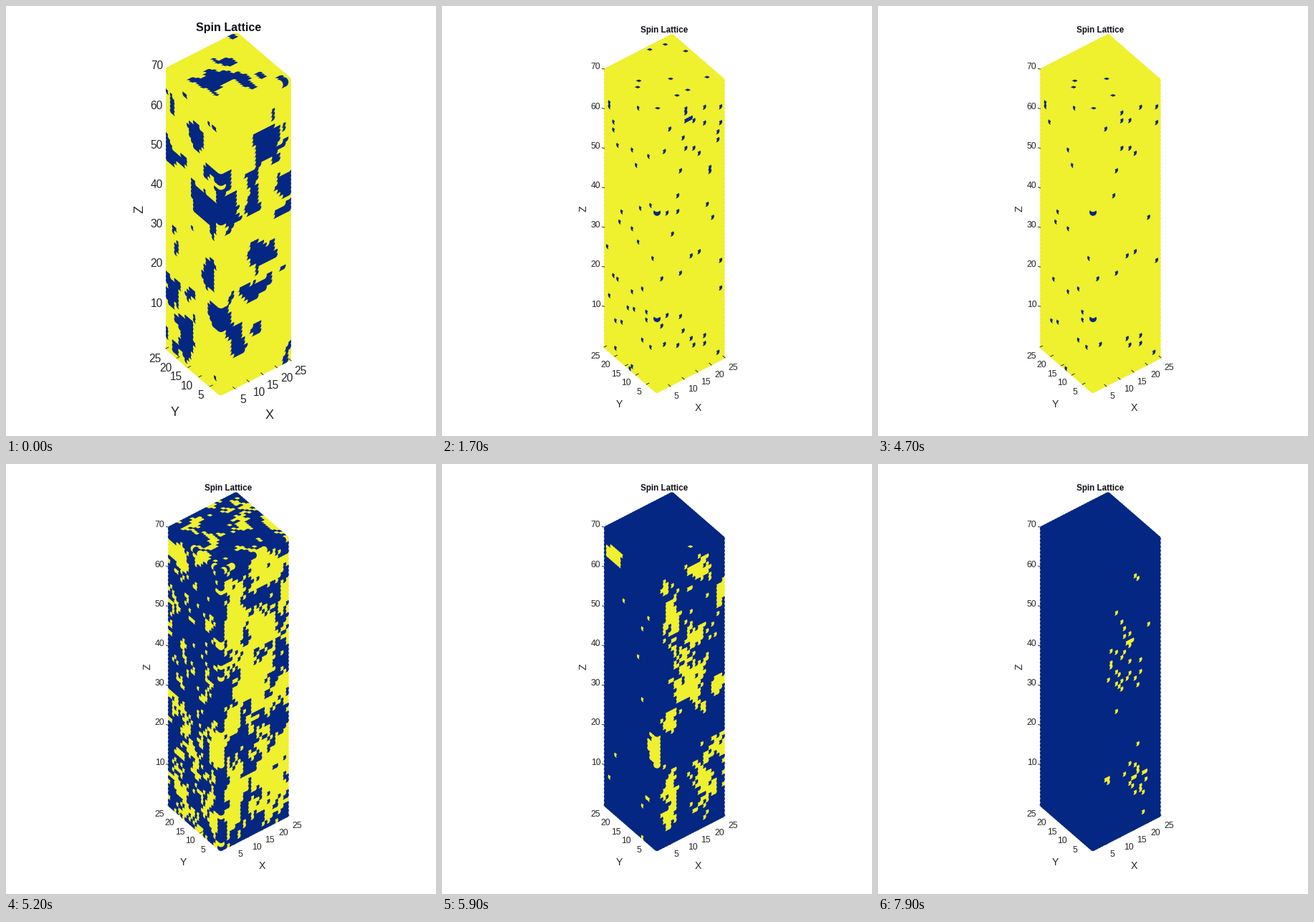
Write a matplotlib script that moves like this. It is 600 by 600 pixels and loops after 8000 ms.

```python
import numpy as np
import matplotlib.pyplot as plt
from matplotlib.animation import FuncAnimation
from matplotlib.colors import to_rgba

plt.rcParams["font.family"] = "Liberation Sans"
rng = np.random.default_rng(11)

SIZE, DPI, FRAMES, STEP = 600, 100, 80, 100
YELLOW, BLUE, INK = "#eff02e", "#042783", "#262626"
NX, NZ = 25, 71
SWITCH = 14          # the large view gives way to the small one
FLIP = 48            # the field reverses
PX = 72 / DPI        # points per pixel


class View:
    """Oblique projection of the lattice, drawn with discs of one radius."""

    def __init__(self, radius, origin, x, y, z):
        self.r, self.origin = radius, np.array(origin)
        self.axes = np.array([x, y, z])

    def centers(self):
        return self.origin + cells @ self.axes

    def visible(self):
        return self.centers() + peek * self.r


LARGE = View(7, (300, 536.2), (3.79, -1.92), (-2.92, -2.5), (0, -5.513))
SMALL = View(5, (300, 535), (3.74, -1.92), (-2.88, -2.5), (0, -5.493))

# Only the three faces towards the viewer are needed; far spins come first
cells = np.array([(i, j, k) for i in range(NX) for j in range(NX)
                  for k in range(NZ) if i == 0 or j == 0 or k == NZ - 1])
cells = cells[np.argsort(cells @ np.array([-2.3, -2.9, 4.93]), kind="stable")]
I, J, K = cells.T
count = len(cells)
front = (I == 0) & (J == 0)
top = (K == NZ - 1) & (I > 0) & (J > 0)
right = (J == 0) & ~front
left = (I == 0) & ~front
slope = np.select([right, left], [0.51, -0.87], 0.0)

# Middle of the part of each disc its neighbours leave uncovered
peek = np.select([front[:, None], top[:, None], right[:, None]],
                 [(0, 0.8), (0.05, -0.74), (0.64, 0.2)], (-0.66, 0.2))


def smooth_noise(passes=2):
    """Random field over the lattice with domains a few spins wide."""
    field = rng.normal(size=(NX, NX, NZ))
    for axis in (0, 1, 2) * passes:
        field = field + np.roll(field, 1, axis) + np.roll(field, -1, axis)
    values = field[I, J, K]
    return (values - values.mean()) / values.std()


def domains(view, boxes, floor, rough=0.3):
    """Positive inside domains: a few large ones plus small random ones.

    Each box is a centre with half width and half height, sheared to its face.
    """
    x, y = view.visible().T
    depth = np.full(count, -floor)
    for cx, cy, w, h in boxes:
        dx, dy = x - cx, y - cy
        edge = np.maximum(abs(dx) / w, abs(dy + slope * dx) / h)
        depth = np.maximum(depth, 1 - edge)
    return depth + rough * smooth_noise()


def erode(depth, first, span):
    """Domains shrink from the rim inward, with some scatter."""
    mix = 0.6 * np.clip(depth, 0, 1) + 0.4 * rng.random(count)
    return first + np.floor(span * mix).astype(int)


def pin(times, picks, keep, first, last):
    """Pinned spins: a share holds for good, the others let go early on."""
    n = len(picks)
    let_go = first + (last - first) * rng.random(n) ** 2
    times[picks] = np.where(rng.random(n) < keep, FRAMES, let_go.astype(int))


def cloud(view, x, y, sx, sy, n):
    """The spins nearest to n points scattered about one place."""
    spots = view.visible()
    points = rng.normal((x, y), (sx, sy), (n, 2))
    return [np.argmin(((spots - p) ** 2).sum(axis=1)) for p in points]


BLUE_DOMAINS = [
    (234, 213, 13, 12), (265, 180, 9, 15), (283, 283, 18, 18), (286, 372, 7, 26),
    (234, 398, 8, 18), (252, 460, 9, 26), (298, 438, 13, 16), (362, 194, 15, 22),
    (346, 258, 8, 28), (387, 262, 11, 28), (308, 285, 13, 18), (358, 338, 15, 16),
    (349, 398, 20, 14), (320, 468, 11, 22), (303, 102, 28, 10)]
GOLD_DOMAINS = [
    (237, 128, 12, 10), (294, 400, 8, 22), (320, 215, 13, 50), (358, 148, 18, 22),
    (388, 184, 8, 28), (357, 242, 26, 27), (347, 302, 25, 36), (381, 315, 16, 18),
    (317, 356, 10, 17), (384, 390, 10, 24), (371, 440, 18, 38), (320, 468, 10, 45)]
GOLD_CLOUDS = [(342, 262, 13, 24, 46), (350, 304, 16, 8, 20), (365, 438, 9, 18, 26),
               (355, 155, 4, 3, 6), (320, 440, 2, 7, 5)]

# A spin is blue on [start, off) and again from on
depth = domains(LARGE, BLUE_DOMAINS, 0.45)
off = np.where(depth > 0, erode(depth, 1, 9), 0)
pin(off, rng.choice(np.flatnonzero(~front), 105, replace=False), 0.45, 10, 47)
off[front & np.isin(K, (18, 45))] = FRAMES
start = np.where((off > 9) & (depth <= 0), 1, 0)

tide = np.clip(0.5 + 0.3 * smooth_noise(), 0, 1)
on = FLIP + np.floor(7.5 * (0.6 * tide + 0.4 * rng.random(count))).astype(int)
depth = domains(SMALL, GOLD_DOMAINS, 0.6)
on = np.where(depth > 0, erode(depth, 56, 10), on)
specks = (rng.random(count) < 0.02) & (depth <= 0)
on[specks] = rng.integers(56, 61, specks.sum())
for spot in GOLD_CLOUDS:
    pin(on, cloud(SMALL, *spot), 0.7, 67, 79)

fig = plt.figure(figsize=(SIZE / DPI, SIZE / DPI), dpi=DPI, facecolor="white")
ax = fig.add_axes([0, 0, 1, 1])
ax.set(xlim=(0, SIZE), ylim=(SIZE, 0))
ax.axis("off")
spins = ax.scatter(*LARGE.centers().T, s=1, linewidths=0, zorder=2)


def label(spot, text, size, **style):
    style = {"ha": "center", "va": "center", "color": INK, **style}
    return ax.text(*spot, text, fontsize=size * PX, zorder=4, **style)


def tick(spot, way):
    x, y = spot
    return ax.plot([x, x + way[0]], [y, y + way[1]], color=INK, lw=0.7, zorder=3)[0]


def ruler(first, last, corner, end, way, size, ha):
    """Numbers 5 to 25 and their tick marks along one bottom edge."""
    parts = []
    for n, (spot, mark) in enumerate(zip(np.linspace(first, last, 5),
                                         np.linspace(corner, end, 6)[1:])):
        parts += [label(spot, str(5 * n + 5), size, ha=ha), tick(mark, way)]
    return parts


def heights(x, y, size):
    return [label((x, y + 55.2 * n), str(70 - 10 * n), size, ha="right")
            for n in range(7)]


def names(title, x, y, z, title_size, size):
    return [label(title, "Spin Lattice", title_size, weight="bold", color="#101018"),
            label(x, "X", size), label(y, "Y", size),
            label(z, "Z", size, rotation=90)]


X_WAY, Y_WAY = (-3, -2.6), (3.6, -1.8)
large_parts = [
    *names((310.5, 30), (368, 571), (236, 567), (187, 283), 16, 18),
    *heights(219, 84, 15.5),
    *ruler((326, 549), (402, 509.5), (300, 544), (398, 495), X_WAY, 15.5, "left"),
    *ruler((276, 543), (217, 492.5), (300, 544), (223, 478), Y_WAY, 15.5, "right")]
small_parts = [
    *names((310.5, 34.5), (357, 561), (247, 556), (198, 283), 11.6, 14),
    *heights(221.5, 85.5, 12.2),
    *ruler((324, 545), (399, 505.5), (300, 541), (395, 491), X_WAY, 12.2, "left"),
    *ruler((278, 539), (221, 488.5), (300, 541), (226, 476), Y_WAY, 12.2, "right"),
    *[tick((223.5, 87.5 + 55.2 * n), (3, 0.5)) for n in range(7)]]

palette = np.array([to_rgba(YELLOW), to_rgba(BLUE)])


def draw(frame):
    is_large = frame < SWITCH
    view = LARGE if is_large else SMALL
    blue = ((frame >= start) & (frame < off)) | (frame >= on)
    spins.set_offsets(view.centers())
    spins.set_sizes([(2 * view.r * PX) ** 2])
    spins.set_facecolors(palette[blue.astype(int)])
    for part in large_parts:
        part.set_visible(is_large)
    for part in small_parts:
        part.set_visible(not is_large)
    return [spins, *large_parts, *small_parts]


anim = FuncAnimation(fig, draw, frames=FRAMES, interval=STEP,
                     repeat=True, repeat_delay=0, blit=False)
plt.show()
```
